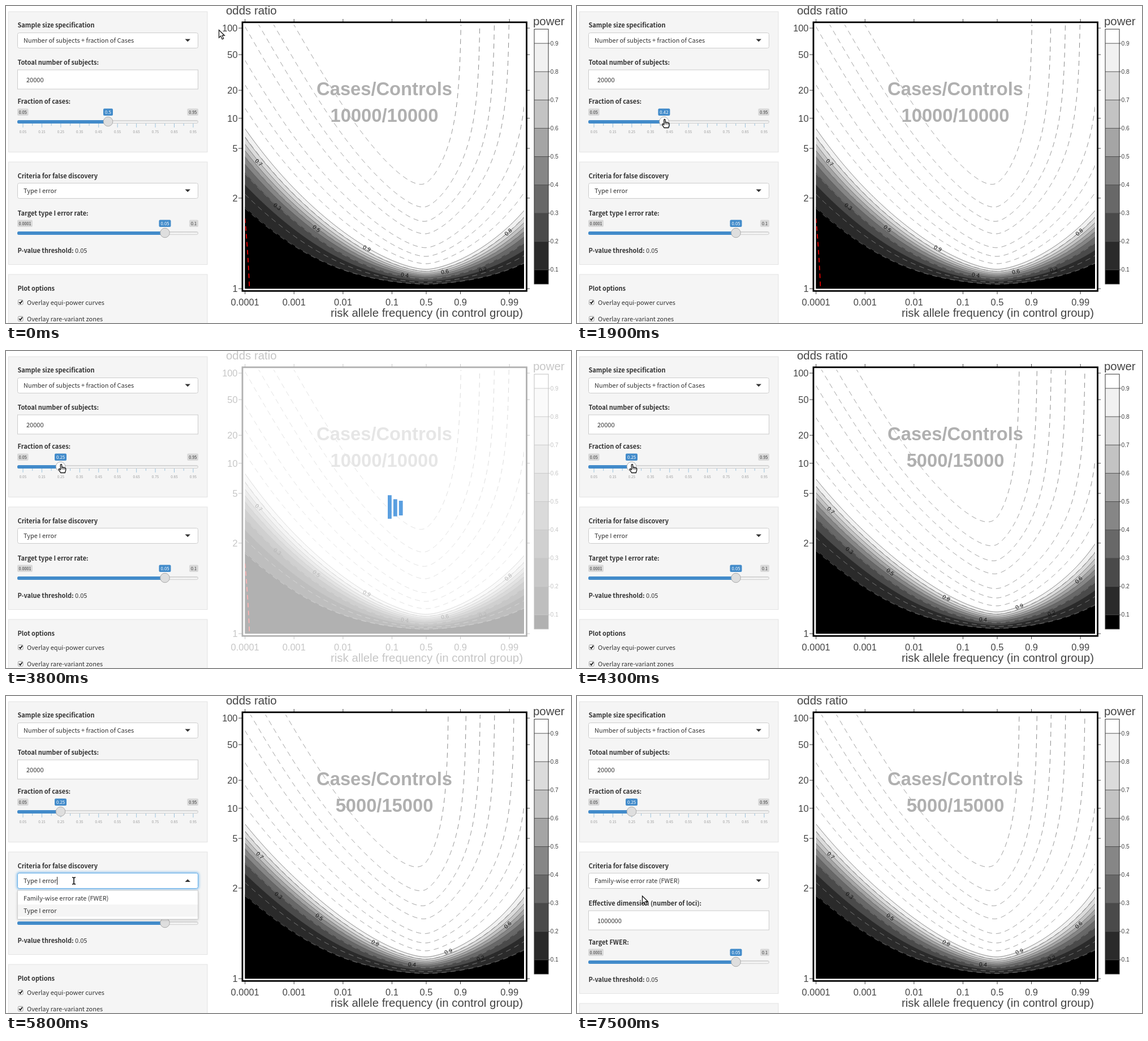
An HTML page for the animation above (8000 ms loop, 999 px wide and 561 px high).

```html
<!DOCTYPE html>
<html lang="en">
<head>
<meta charset="utf-8">
<title>Power explorer</title>
<style>
html, body { margin: 0; width: 100%; height: 100%; overflow: hidden; background: #fff; }
svg { display: block; }
#ui text { font: 11px "Noto Sans CJK JP", "Noto Sans CJK SC", "Noto Sans CJK", sans-serif; fill: #333; }
#ui .b { font-weight: bold; }
#ui .end { font-size: 7.2px; text-anchor: middle; }
#ui .val { font-size: 7.8px; text-anchor: middle; fill: #fff; }
#ui .tick { font-size: 6.4px; text-anchor: middle; fill: #999; }
#plot text, .plot text { font: 16.4px "Liberation Sans", sans-serif; fill: #444; }
.plot .axis { font-size: 20.4px; }
.plot .mid { text-anchor: middle; }
.plot .right { text-anchor: end; }
.plot .bar { font-size: 10.2px; }
.plot .lab { font-size: 10px; text-anchor: middle; fill: #111; }
.plot .big { font-size: 32.7px; font-weight: bold; text-anchor: middle; fill: #b0b0b0; }
</style>
</head>
<body>
<svg width="999" height="561" viewBox="0 0 999 561">
  <defs>
    <clipPath id="area"><rect x="422.5" y="33" width="493.5" height="467.5"/></clipPath>
    <linearGradient id="track" x2="0" y2="1"><stop stop-color="#ddd"/><stop offset="1" stop-color="#fff"/></linearGradient>
    <filter id="soft" x="-5%" y="-20%" width="110%" height="150%"><feGaussianBlur stdDeviation="2"/></filter>
  </defs>
  <g id="ui"></g>
  <g id="before" class="plot"></g>
  <g id="after" class="plot"></g>
  <g id="spinner" fill="#5a9fe0"></g>
  <g id="pointer"></g>
</svg>
<script>
const $ = id => document.getElementById(id);
const text = (x, y, s, cls = '', more = '') => `<text x="${x}" y="${y}" class="${cls}" ${more}>${s}</text>`;
const rect = (x, y, w, h, fill, more = '') =>
  `<rect x="${x}" y="${y}" width="${w}" height="${h}" fill="${fill}" ${more}/>`;
const path = (d, stroke, more = '') => `<path d="${d}" fill="none" stroke="${stroke}" ${more}/>`;
const clamp = v => Math.max(0, Math.min(1, v));
const smooth = v => v * v * (3 - 2 * v);
const mix = (a, b, k) => a + (b - a) * k;

// ---------- power chart ----------
const LEFT = 422.5, RIGHT = 916, TOP = 33, BASE = 500.2, CENTRE = 743, DECADE = 86.6;
const ALLELES = 40000;
// square roots of the noncentrality giving power 0.1 ... 0.9 at the 5% level
const NONCENTRAL = [.652, 1.115, 1.4345, 1.7066, 1.96, 2.2133, 2.4844, 2.8016, 3.2415];
const GRAYS = [0, 42, 74, 104, 134, 165, 195, 219, 241, 255].map(v => `rgb(${v},${v},${v})`);
const EFFECTS = [1e-5, 1e-4, 1e-3, 1e-2].flatMap(d => [d, 2 * d, 5 * d]);

const xOf = f => f <= .5 ? CENTRE + DECADE * Math.log10(2 * f) : CENTRE - DECADE * Math.log10(2 - 2 * f);
const yOf = odds => BASE - 153.9 * Math.log10(10 * odds - 9);

function effect(tail, rare, odds, share) {
  // tail is the smaller allele frequency, kept exact near both ends
  const f = rare ? tail : 1 - tail;
  const p = f * odds / (1 - f + f * odds);
  const mean = share * p + (1 - share) * f;
  return share * (1 - share) * (p - f) ** 2 / (mean * (1 - mean));
}

function curve(level, share) {
  const points = [];
  const highest = (BASE - TOP + 3) / 153.9;
  for (let x = LEFT; x <= RIGHT; x += .25) {
    const tail = .5 * 10 ** (-Math.abs(x - CENTRE) / DECADE);
    let low = 0, high = highest;
    for (let i = 0; i < 22; i++) {
      const m = (low + high) / 2;
      if (effect(tail, x < CENTRE, (10 ** m + 9) / 10, share) < level) low = m; else high = m;
    }
    points.push([x, BASE - 153.9 * low]);
  }
  const inside = p => p && p[1] > TOP - 2.9;
  return 'M' + points.filter((p, i) => inside(p) || inside(points[i - 1]) || inside(points[i + 1]))
    .map(p => p[0].toFixed(2) + ' ' + p[1].toFixed(2)).join('L');
}

function chart(share, counts, labels, rareZone) {
  let inner = '';
  for (let i = 8; i >= 0; i--) {
    const d = curve(NONCENTRAL[i] ** 2 / ALLELES, share);
    inner += `<path d="${d}V${BASE}H${LEFT}Z" fill="${GRAYS[i]}"/>` + path(d, '#555', 'stroke-width=".8"');
  }
  for (const e of EFFECTS) inner += path(curve(e, share), '#888', 'stroke-dasharray="9 7"');
  if (rareZone) inner += path('M422.5 376Q428 436 430.5 500', '#f00', 'stroke-width="1.6" stroke-dasharray="8 6"');

  let out = `<g clip-path="url(#area)">${inner}</g>`;
  for (const [s, x, y, turn] of labels)
    out += text(0, 3.5, s, 'lab', `transform="translate(${x} ${y}) rotate(${turn})"`);
  out += text(669, 158, 'Cases/Controls', 'big') + text(669, 204.5, counts, 'big');

  let ticks = '';
  for (const odds of [1, 2, 5, 10, 20, 50, 100]) {
    const y = yOf(odds);
    ticks += `M411 ${y}h6M921 ${y}h5`;
    out += text(409.5, y + 6, odds, 'right');
  }
  for (const f of [.0001, .001, .01, .1, .5, .9, .99]) {
    const x = xOf(f);
    ticks += `M${x} 23v5M${x} 505v5`;
    out += text(x, 530, f, 'mid');
  }
  out += path(ticks, '#444') + rect(418, 28.8, 502.5, 475.5, 'none', 'stroke="#000" stroke-width="2.8"');
  out += text(389, 15, 'odds ratio', 'axis') + text(914, 550, 'risk allele frequency (in control group)', 'axis right');

  out += text(932, 34, 'power', 'axis');
  let rules = '';
  for (let i = 0; i < 10; i++) {
    const y = 517 - 50.1 * i, top = Math.max(41, y - 50.1), bottom = Math.min(492, y);
    out += rect(934, top, 25, bottom - top, GRAYS[i]);
    if (i) {
      rules += `M934 ${y}h28`;
      out += text(962.5, y + 3.5, (i / 10).toFixed(1), 'bar');
    }
  }
  return out + path(rules, '#444', 'stroke-width=".9"') + rect(934, 41, 25, 451, 'none', 'stroke="#333"');
}

$('before').innerHTML = chart(.5, '10000/10000', [
  ['0.7', 447, 277, 44], ['0.3', 480, 355, 36], ['0.5', 549, 394, 37], ['0.9', 638, 429, 26],
  ['0.4', 705, 476, 7], ['0.6', 776, 470, -12], ['0.2', 843, 467, -13], ['0.8', 888, 400, -42]], true);
$('after').innerHTML = chart(.25, '5000/15000', [
  ['0.7', 449, 282, 44], ['0.3', 482, 353, 37], ['0.5', 554, 391, 37], ['0.8', 653, 437, 25],
  ['0.4', 718, 475, 5], ['0.9', 782, 452, -18], ['0.2', 839, 464, -15], ['0.6', 887, 405, -42]], false);

// ---------- form ----------
const panel = (y, h) => rect(4.5, y, 351.5, h, '#f5f5f5', 'stroke="#e3e3e3"');
const field = (y, s) => rect(20.5, y, 319, 34, '#fff', 'stroke="#ccc"') + text(36, y + 21.5, s);

function select(y, s, open) {
  const glow = open ? rect(20.5, y, 319, 27, 'none', 'rx="3" stroke="#66afe9" stroke-width="3" filter="url(#soft)"') : '';
  const arrow = open ? `M316.5 ${y + 15.5}h9.5l-4.75-4.8z` : `M316.5 ${y + 11}h9.5l-4.75 4.8z`;
  return glow + rect(20.5, y, 319, 27, '#fff', `rx="3" stroke="${open ? '#66afe9' : '#ccc'}"`) +
    text(31, y + 17.5, s) + `<path d="${arrow}" fill="#333"/>`;
}

function slider(y, x, value, min, max, hot) {
  const tag = (left, w, s, cls, fill) =>
    rect(left, y - 23.5, w, 12.5, fill, 'rx="2"') + text(left + w / 2, y - 14.4, s, cls);
  const width = s => 5 + 3.65 * s.length, valueWidth = 5 + 4 * value.length;
  return tag(20, width(min), min, 'end', '#d8d8d8') + tag(340 - width(max), width(max), max, 'end', '#d8d8d8') +
    tag(x - valueWidth / 2, valueWidth, value, 'val', '#428bca') +
    rect(20.5, y - 2.5, 319, 5, 'url(#track)', 'rx="2.5" stroke="#ccc"') +
    rect(20, y - 3, x - 20, 6, '#428bca', 'rx="2.5"') +
    `<circle cx="${x}" cy="${y - .5}" r="8.3" fill="${hot ? '#fff' : '#dedede'}" stroke="#aaa"/>`;
}

function checkbox(y, s) {
  return rect(21.5, y - 9, 8.5, 8.5, '#fff', 'rx="1.5" stroke="#999"') +
    path(`M23.3 ${y - 5}l2 2.4 3.6-5`, '#222', 'stroke-width="1.9"') + text(37, y, s);
}

function menu(hoverFirst) {
  return rect(20.5, 346, 319, 50, '#0004', 'filter="url(#soft)"') +
    rect(20.5, 344, 319, 51, '#fff', 'stroke="#d0d0d0"') +
    rect(21, hoverFirst ? 347.5 : 369, 318, 21.5, '#f5f5f5') +
    text(31, 362, 'Family-wise error rate (FWER)') + text(31, 383.5, 'Type I error');
}

function form(t) {
  const open = t >= 5800 && t < 7500, family = t >= 7500, shift = family ? 69 : 0;
  const share = mix(.5, .25, smooth(clamp((t - 1600) / 800)));
  const tickX = i => 30 + 33.44 * i;
  let ticks = '', out = panel(10, 248.5) +
    text(20.5, 38, 'Sample size specification', 'b') + select(47.5, 'Number of subjects + fraction of Cases') +
    text(20.5, 104, 'Totoal number of subjects:', 'b') + field(113, '20000') +
    text(20.5, 173, 'Fraction of cases:', 'b');
  for (let i = 0; i < 10; i++) {
    ticks += `M${tickX(i)} 208v7` + (i < 9 ? `M${tickX(i + .5)} 208v4` : '');
    out += text(tickX(i), 225.3, (.05 + i / 10).toFixed(2), 'tick');
  }
  out += path(ticks, '#9cc3dd') +
    slider(205, 180.5 + 336 * (share - .5), String(+share.toFixed(2)), '0.05', '0.95', t >= 1300 && t < 5000);

  out += panel(276, 181.5 + shift) + text(20.5, 305, 'Criteria for false discovery', 'b') +
    select(313.5, family ? 'Family-wise error rate (FWER)' : 'Type I error', open);
  if (family) out += text(20.5, 371, 'Effective dimension (number of loci):', 'b') + field(380, '1000000');
  out += text(20.5, 371 + shift, family ? 'Target FWER:' : 'Target type I error rate:', 'b') +
    slider(402 + shift, 281, '0.05', '0.0001', '0.1') +
    text(20.5, 437 + shift, '<tspan class="b">P-value threshold:</tspan> 0.05');

  out += panel(475 + shift, 120) + text(20.5, 503.5 + shift, 'Plot options', 'b') +
    checkbox(529 + shift, 'Overlay equi-power curves') + checkbox(558.3 + shift, 'Overlay rare-variant zones');
  if (open) {
    out += menu(t >= 7000);
    if (t < 6500 || t >= 7000) out += path('M90.5 320v14', '#222');
  }
  return out;
}

// ---------- pointer and spinner ----------
const SHAPES = {
  arrow: '<path d="M0 0v13.6l3.2-3 2.5 5.6 2.5-1.1-2.5-5.4h4.2z" fill="#fff" stroke="#111" stroke-width="1.2"/>',
  hand: '<path d="M-1.2 1Q0-1 1.2 1V5.5Q2.6 4.3 3.7 5.8 5.2 4.8 6.2 6.4 8 6 8.2 8V10.5L6.8 15H-.8L-4.4 9.4Q-4.6 7.6-2.8 8.2L-1.2 9.6Z" fill="#fff" stroke="#111" stroke-width="1.3"/>' +
    path('M1.2 6v3M3.7 6.2v3M6.2 7v2.3', '#111'),
  beam: path('M-3-6Q0-6 0-4.5 0-6 3-6M-3 6Q0 6 0 4.5 0 6 3 6M0-5V5', '#fff', 'stroke-width="3"') +
    path('M-3-6Q0-6 0-4.5 0-6 3-6M-3 6Q0 6 0 4.5 0 6 3 6M0-5V5', '#111', 'stroke-width="1.6"')
};

function pointer(t) {
  const place = (shape, x, y) => `<g transform="translate(${x} ${y})">${SHAPES[shape]}</g>`;
  if (t < 1200) {
    const k = smooth(clamp((t - 200) / 900));
    return place('arrow', mix(376.5, 191.5, k), mix(42.5, 192.5, k));
  }
  if (t < 1300) return place('arrow', 186.5, 197);
  if (t < 5000) return place('hand', mix(181.5, 97.5, smooth(clamp((t - 1600) / 800))), 200.5);
  if (t < 6500) {
    const k = smooth(clamp((t - 4900) / 700)), y = mix(202, 327, k);
    return place(y > 314 ? 'beam' : 'arrow', mix(98, 120, k), y);
  }
  return place('arrow', 115.5, t < 7000 ? 341.5 : 354);
}

function spinner(t) {
  if (t < 3800 || t >= 4300) return '';
  const clock = Math.min(t, 4100) - 3800;
  return [.28, .12, -.04].map((start, i) => {
    const phase = (start + clock / 1000 + 1) % 1;
    const grow = smooth(clamp(phase < .4 ? phase / .4 : (.8 - phase) / .4));
    return rect(675 + 9.9 * i, 265 - 12.5 * grow, 6.8, 26 + 20 * grow, '#5a9fe0');
  }).join('');
}

let shown = -1;
function draw(now) {
  const t = Math.floor(now % 8000 / 100) * 100;
  if (t !== shown) {
    shown = t;
    $('ui').innerHTML = form(t);
    $('before').style.display = t < 4300 ? '' : 'none';
    $('after').style.display = t < 4300 ? 'none' : '';
    $('before').style.opacity = t >= 3800 ? .3 : 1;
    $('spinner').innerHTML = spinner(t);
    $('pointer').innerHTML = pointer(t);
  }
}
const start = performance.now();
(function loop() {
  draw(performance.now() - start);
  requestAnimationFrame(loop);
})();
</script>
</body>
</html>
```
